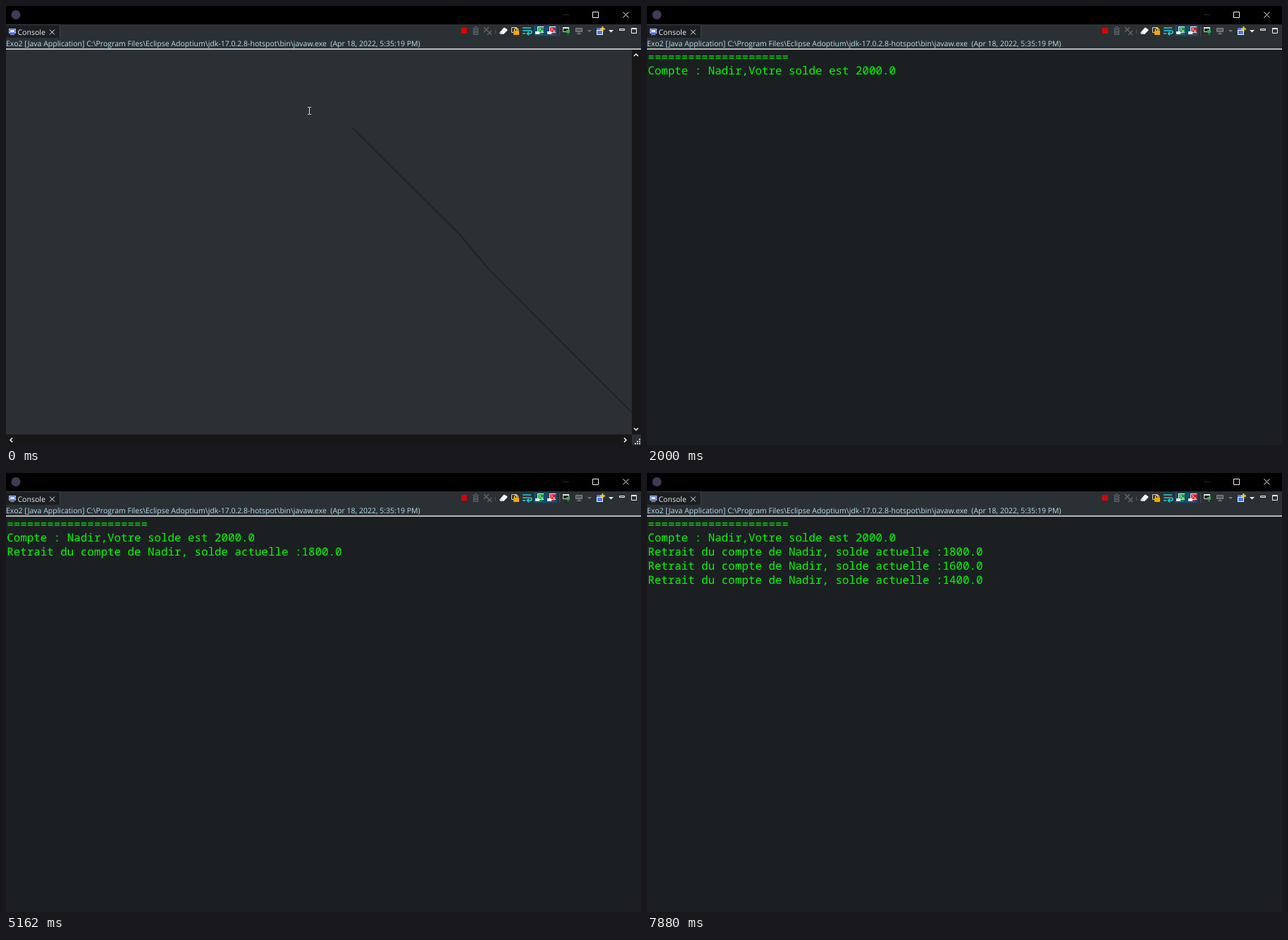
An HTML page for the animation above (8 s loop, 901 px wide and 622 px high).

```html
<!DOCTYPE html>
<html lang="fr">
<head>
<meta charset="utf-8">
<title>Console</title>
<style>
  html, body { margin: 0; height: 100%; overflow: hidden; background: #1b1f22; }
  svg { display: block; width: 901px; height: 622px; }
  text { white-space: pre; text-rendering: geometricPrecision; }
  .ui { font-family: "Open Sans", sans-serif; }
  .out { font: 500 15.85px "Noto Sans Mono", monospace; fill: #0f0; }
  .line { fill: none; stroke: #f4f4f4; }
</style>
</head>
<body>
<svg viewBox="0 0 901 622">
  <defs>
    <g id="stream">
      <path d="M754 29h9v9h-9z" fill="#f2f5f5"/>
      <path d="M755 30h8v7h-8z" fill="currentColor"/>
      <path d="M756.5 31l2 2-2 2M759 35.5h3" fill="none" stroke="#fff"/>
      <path d="M751 36h6v4h-6z" fill="#f5f5f5"/>
      <path d="M757 39.500h4" stroke="currentColor" stroke-width="1.5"/>
    </g>
  </defs>

  <rect id="page" y="61" width="901" height="561" fill="#1b1f22"/>

  <g id="scrollbars">
    <path d="M888 62h13v545h-13zM0 607h888v15H0z" fill="#171717"/>
    <path d="M888 607h13v15h-13z" fill="#2b3034"/>
    <path class="line" stroke-width="1.5" d="M891 71l3-3 3 3M891 598l3 3 3-3M9 612l-3 3 3 3M877 612l3 3-3 3"/>
    <path d="M898 613h2v2h-2zM895 616h2v2h-2zM898 616h2v2h-2zM892 619h2v2h-2zM895 619h2v2h-2zM898 619h2v2h-2z" fill="#c8c8c8"/>
  </g>

  <g id="ghost" fill="none">
    <path d="M491 172L645 325 685 373 888 576" stroke="#1d2023" stroke-width="1.7"/>
    <path d="M428 143.5h2l.5 .5 .5-.5h2M430.5 144v9M428 153.5h2l.5-.5 .5 .5h2" stroke="#d8dadb"/>
  </g>

  <!-- title bar -->
  <rect width="901" height="26" fill="#000"/>
  <circle cx="14" cy="12.5" r="6.5" fill="#443a58"/>
  <path class="line" d="M832.5 8.5h8v8h-8zM875.5 8.5l8 8M883.5 8.5l-8 8"/>
  <path d="M790 12.5h9" stroke="#292929"/>

  <!-- tab and description -->
  <rect y="26" width="901" height="35" fill="#2b3034"/>
  <path d="M0 27h76v18H0z" fill="#1b1f22"/>
  <path d="M0 26.5h76.5V45" fill="none" stroke="#3b4145"/>
  <path d="M4 32h10v7H4zM6 40h6v1H6z" fill="#a9b9f5"/>
  <path d="M5.5 33.5h7v4h-7z" fill="#e5ebff" stroke="#4968dc"/>
  <text class="ui" x="16.5" y="41" font-size="10.5" fill="#f2f2f2">Console</text>
  <path class="line" d="M62 33.5l7 7M69 33.5l-7 7"/>
  <text class="ui" x="0" y="57" font-size="10.53" fill="#b3e0f0">Exo2 [Java Application] C:\Program Files\Eclipse Adoptium\jdk-17.0.2.8-hotspot\bin\javaw.exe  (Apr 18, 2022, 5:35:19 PM)</text>
  <path d="M0 61h901" stroke="#e6e6e6" stroke-width="1.6"/>

  <!-- toolbar -->
  <path d="M646 31h8v8h-8z" fill="#e00000"/>
  <g fill="none" stroke="#656a6d">
    <path d="M662 31.5h9M665 29.5h3M663.5 33.5h6v7h-6zM665.5 35v4M667.5 35v4" stroke-width="1.2"/>
    <path d="M678 30l7 7M685 30l-7 7M683 35l6 6M689 35l-6 6" stroke-width="1.3"/>
    <path d="M694.5 34v5M785.5 29v13" stroke-dasharray="1 1"/>
  </g>
  <path d="M700 38l6-7q1-1 2 0l3 2q1 1 0 2l-5 5h-4z" fill="#fff"/>
  <path d="M701 37l4 3" stroke="#8b9295"/>

  <path d="M717.5 30.5h7v7h-7z" fill="none" stroke="#d5d5d5"/>
  <path d="M721.5 35v-2q2.5-3 5 0v2" fill="none" stroke="#ffc21c" stroke-width="1.4"/>
  <path d="M720 35h8v6h-8z" fill="#f5a800"/>

  <path d="M733 31h12M733 35h11q2 0 2 2t-2 2h-4M733 39h4M742 36.5l-2.5 2.5 2.5 2.5" fill="none" stroke="#19d3dc" stroke-width="1.6"/>

  <path d="M749 27.5h33v15h-33z" fill="#174a70"/>
  <use href="#stream" color="#16a13a"/>
  <use href="#stream" x="17" color="#d8202a"/>

  <path d="M790.5 30.5h8v6h-8z" fill="#15191b" stroke="#d7d7d7"/>
  <path d="M790 30h9v2h-9z" fill="#e8e8e8"/>
  <path d="M795 34h5v4h-5zM797 38h1v3h-1z" fill="#20b83b"/>

  <path d="M808.5 31.5h9v5h-9zM813 37v2M810 39.5h6" fill="#555b5e" stroke="#858a8d"/>
  <path d="M825 34h6l-3 3z" fill="#777"/>
  <path d="M838 31h9v10h-9z" fill="#f1f4ff"/>
  <path d="M838 31h9v3h-9zM839 35h7v5h-7z" fill="#4c78e8"/>
  <path d="M846.5 29v7M843 32.5h7" stroke="#ffd02b" stroke-width="2"/>
  <path d="M855 34h7l-3.5 3.5z" fill="#eee"/>
  <path class="line" d="M870.5 32.5h7v2h-7zM887.5 31.5h7v7h-7zM887 32.5h8"/>

  <g id="output"></g>
</svg>
<script>
const $ = id => document.getElementById(id);
const LOOP = 8000, holder = "Nadir";
const withdrawal = balance => `Retrait du compte de ${holder}, solde actuelle :${balance}.0`;
const lines = [
  [2000, "=".repeat(21)],
  [2000, `Compte : ${holder},Votre solde est 2000.0`],
  [3980, withdrawal(1800)],
  [5950, withdrawal(1600)],
  [7880, withdrawal(1400)]
];

const rows = lines.map(([start, content], i) => {
  const row = document.createElementNS("http://www.w3.org/2000/svg", "text");
  row.setAttribute("class", "out");
  row.setAttribute("x", 1.3);
  row.setAttribute("y", 77.7 + i * 19.75);
  row.textContent = content;
  $("output").append(row);
  return { row, start };
});

const show = (el, on) => { el.style.display = on ? "" : "none"; };
const origin = performance.now();

function draw() {
  const t = (performance.now() - origin) % LOOP;
  $("page").setAttribute("fill", t < 30 ? "#2b3034" : "#1b1f22");
  show($("ghost"), t < 30);
  show($("scrollbars"), t < 100);
  rows.forEach(({ row, start }) => show(row, t >= start));
  requestAnimationFrame(draw);
}
draw();
</script>
</body>
</html>
```
